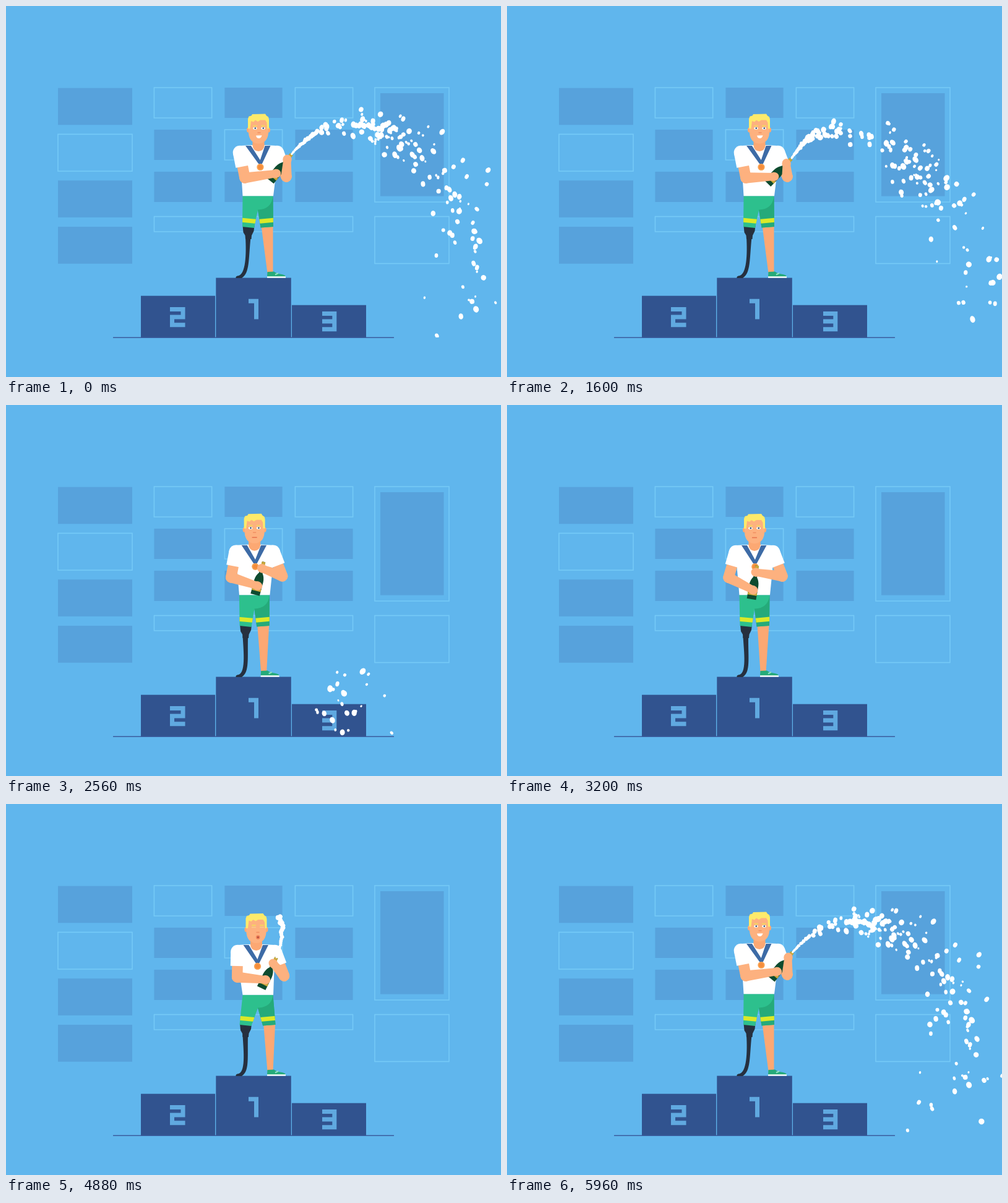
These frames come from a looping animation (800 px wide and 600 px high, 6000 ms). An HTML page with a canvas:

```html
<!DOCTYPE html>
<html lang="en">
<head>
<meta charset="utf-8">
<title>Champion on the podium</title>
<style>
html, body { margin: 0; width: 100%; height: 100%; overflow: hidden; background: #60b6ed; }
canvas { display: block; }
</style>
</head>
<body>
<canvas id="stage" width="800" height="600" aria-label="Winner on a podium spraying foam"></canvas>
<script>
const g = document.getElementById('stage').getContext('2d');
const LOOP = 6, TAU = Math.PI * 2;
const SKIN = '#fdb17f', SKIN_DARK = '#fca873', WHITE = '#fff', DARK = '#26303f', HAIR = '#fdea6b';
const NAVY = '#31538f', PANEL = '#57a2dc', GREEN = '#2dc08d', GREEN_DARK = '#25aa7a';
const LIME = '#dbe928', RIBBON = '#3d6ba6', BOTTLE = '#0e4b2f', GOLD = '#c9a83a';

const mix = (a, b, k) => a + (b - a) * k;
const ramp = (t, from, to) => Math.min(1, Math.max(0, (t - from) / (to - from)));
const ease = (t, from, to) => { const k = ramp(t, from, to); return k * k * (3 - 2 * k); };
const wave = (t, peak, period) => Math.cos((t - peak) / period * TAU);

// ---------- drawing helpers ----------
function fill(color, build) {
  g.fillStyle = color;
  g.beginPath();
  build();
  g.fill();
}
function trace(p) {
  for (let i = 0; i < p.length; i += 2) g.lineTo(p[i], p[i + 1]);
}
function poly(color, ...p) {
  fill(color, () => trace(p));
}
function disc(color, x, y, rx, ry = rx, turn = 0) {
  fill(color, () => g.ellipse(x, y, rx, ry, turn, 0, TAU));
}
function box(color, x, y, w, h) {
  g.fillStyle = color;
  g.fillRect(x, y, w, h);
}
function line(color, width, cap, ...p) {
  g.strokeStyle = color;
  g.lineWidth = width;
  g.lineCap = cap;
  g.beginPath();
  trace(p);
  g.stroke();
}

// ---------- pose: everything follows from how far the body leans, steps and crouches ----------
function poseAt(time) {
  const t = (time + LOOP) % LOOP;
  const lean = 1 - ease(t, 2.1, 2.75) + .56 * ease(t, 4.55, 4.8) + .44 * ease(t, 4.92, 5.25);
  const step = 1 - ease(t, 2.1, 2.75) + ease(t, 4.55, 4.8);
  const crouch = .5 * (ease(t, 1.8, 2.08) - ease(t, 2.15, 2.6)) + .9 * (ease(t, 4.55, 4.8) - ease(t, 4.92, 5.25));
  const aim = (.7 - .3 * wave(t, 0, 1.2)) * (1 - ease(t, 1.65, 2.05) + ease(t, 3, 4));
  const shake = t > 3.2 && t < 4.5 ? Math.sin((t - 3.2) * TAU * 4) * Math.sin(ramp(t, 3.2, 4.5) * Math.PI) : 0;

  const p = {
    hipX: 400 + 7 * step, hipY: 307.3 + 1.5 * crouch,
    chestX: 400 + 8 * lean, chestY: 227 - lean + 1.7 * crouch + 1.3 * shake,
    headX: 400 + 8 * lean, headY: 176 - 1.5 * lean + 2 * crouch + 1.3 * shake,
    kneeL: 386 + 5.5 * step - 5 * crouch, kneeR: 413.5 + 8 * step + 4 * crouch,
    shoe: 409 + 13 * step,
    botX: mix(395, 432 - 13 * aim, lean),
    botY: mix(314, 279 + 9 * aim, lean) + 3 * crouch * (1 - lean) + 6 * shake,
    tilt: mix(.17, .6 + .2 * aim, lean)
  };
  const along = d => [p.botX + d * Math.sin(p.tilt), p.botY - d * Math.cos(p.tilt)];
  p.handL = along(15);
  p.handR = along(44);
  p.nozzle = along(55);
  p.shoulderL = [p.chestX - 30, p.chestY + 11];
  p.shoulderR = [p.chestX + 30, p.chestY + 11];
  p.elbowL = [p.shoulderL[0] - 12 + 20 * lean, p.chestY + 52];
  p.elbowR = [p.shoulderR[0] + 15, p.chestY + 50];
  return p;
}

// ---------- foam ----------
const GRAVITY = 1400, FIRST = -1.24, LAST = 1.9, STEP = 1 / 300;

let seed = 11;
const rnd = () => (seed = seed * 16807 % 2147483647) / 2147483647;

const drops = [];
for (let born = FIRST; born < LAST; born += STEP) {
  const open = ramp(born, FIRST, -1.04);
  const power = 1 - .68 * ramp(born, 1.1, LAST);
  const turn = rnd() * TAU, push = 78 * rnd();
  const drop = {
    born, turn, at: poseAt(born).nozzle,
    vx: 335 * power * mix(.15, 1, open),
    vy: (-440 - 65 * wave(born, .43, 1.25)) * power - 230 * (1 - open),
    jx: Math.cos(turn) * push, jy: Math.sin(turn) * push,
    size: 1.6 + 3.4 * rnd(), shape: 1 + .4 * rnd(), life: .8 + .35 * rnd()
  };
  // foam leaves the bottle in gushes
  const density = open < 1 ? 1 : .6 + .4 * wave(born, .03, .485);
  if (rnd() < density) drops.push(drop);
}

function drawFoam(t) {
  const now = t > 4 ? t - LOOP : t;
  g.save();
  g.beginPath();
  g.rect(0, 0, 800, 536);
  g.clip();
  for (const d of drops) {
    const a = now - d.born;
    if (a < 0 || a > d.life) continue;
    const spread = a * Math.min(1, .25 + a * 2.2);
    const r = mix(4.6, d.size, ramp(a, 0, .35)) * Math.min(1, .35 + a * 5);
    const wide = Math.sqrt(d.shape);
    disc(WHITE, d.at[0] + d.vx * a + d.jx * spread,
      d.at[1] + d.vy * a + GRAVITY / 2 * a * a + d.jy * spread,
      r / wide, r * wide, d.turn / 4 - .8);
  }
  g.restore();
}

// ---------- scenery ----------
function panel(outlined, x, y, w, h) {
  if (!outlined) return box(PANEL, x, y, w, h);
  g.strokeStyle = '#75caf7';
  g.lineWidth = 1.6;
  g.strokeRect(x, y, w, h);
}

function drawWall() {
  box('#60b6ed', 0, 0, 800, 600);
  for (let i = 0; i < 4; i++) panel(i === 1, 84, 132.6 + 74.8 * i, 120, 59.7);
  for (let row = 0; row < 3; row++)
    for (let col = 0; col < 3; col++)
      panel(row < 2 && (row + col) % 2 === 0, 239.4 + 114 * col, 132 + 68 * row, 93.2, 49);
  panel(true, 239.5, 340.5, 321, 24.5);
  panel(true, 596, 132, 120, 185);
  panel(false, 605, 141, 102.5, 166.5);
  panel(true, 596, 340.5, 120, 76);
}

function drawPodium() {
  const digit = (...p) => line('#60a9e0', 7, 'butt', ...p);
  box(NAVY, 218, 468.7, 120, 67.6);
  box(NAVY, 339.3, 439.6, 121.5, 96.7);
  box(NAVY, 462, 483.7, 120, 52.6);
  line('#3b5d9e', 1.5, 'butt', 173, 536.3, 627, 536.3);
  g.lineJoin = 'miter';
  digit(265, 490.5, 286, 490.5, 286, 503, 268.5, 503, 268.5, 515.8, 289.5, 515.8);
  digit(392, 477.2, 404.5, 477.2, 404.5, 506.5);
  digit(511, 497.5, 530.8, 497.5, 530.8, 522.8, 511, 522.8);
  digit(511, 510, 530, 510);
}

// ---------- athlete ----------
function drawLegs({ hipX: h, hipY: y, kneeL: l, kneeR: r, shoe: s }) {
  poly(SKIN_DARK, r - 9, 355, r + 10, 355, s + 9.5, 432, s + .5, 432);
  fill(GREEN_DARK, () => {
    trace([s, 438, s + .5, 430, s + 11, 429.5]);
    g.quadraticCurveTo(s + 15, 433, s + 24, 434);
    g.quadraticCurveTo(s + 30, 435, s + 30, 438);
  });
  line('#8fe0c0', 2, 'butt', s + 13, 434.5, s + 18, 432);
  box(WHITE, s, 437.3, 30, 2.4);

  // running blade
  poly(DARK, l - 9, 355, l + 10, 355, l + 9, 364, l + 5.5, 371, l + 5, 377, l - 4.5, 377, l - 5, 371, l - 8, 366);
  fill(DARK, () => {
    g.moveTo(l - 4.5, 374);
    g.bezierCurveTo(l - 3, 400, 388, 436, 374, 436.5);
    g.quadraticCurveTo(371, 437, 371.5, 440);
    g.lineTo(381, 440);
    g.bezierCurveTo(394, 432, mix(392, l, .4), 410, l + 4, 374);
  });

  // shorts
  g.save();
  g.beginPath();
  trace([h - 24.5, y, h + 24.5, y, r + 10.5, 357, r - 10, 358.5, h, 330, l + 9.5, 359, l - 9.5, 357]);
  g.clip();
  box(GREEN, h - 40, y - 2, 80, 60);
  fill(GREEN_DARK, () => {
    g.moveTo(h + 24.5, y);
    g.quadraticCurveTo(h + 22, 329, h, 329.5);
    trace([h, 362, h + 40, 362, h + 40, y]);
  });
  line(LIME, 7, 'butt', l - 13, 346, l + 14, 348.5);
  line(LIME, 7, 'butt', r - 14, 348.5, r + 13, 346);
  g.restore();
}

function drawUpperArm([x, y], [ex, ey]) {
  const k = 23 / Math.hypot(ex - x, ey - y);
  line(SKIN, 17.5, 'round', x, y, ex, ey);
  line(WHITE, 22.5, 'butt', x, y, mix(x, ex, k), mix(y, ey, k));
  disc(WHITE, x, y, 11.3);
}

function drawForearm([ex, ey], [hx, hy]) {
  g.save();
  g.translate(ex, ey);
  g.rotate(Math.atan2(hy - ey, hx - ex));
  const length = Math.hypot(hx - ex, hy - ey);
  poly(SKIN, 0, -8.7, length, -6, length, 6, 0, 8.7);
  disc(SKIN, 0, 0, 8.7);
  disc(SKIN, length, 0, 8, 7.2);
  g.restore();
}

function drawBottle(p) {
  g.save();
  g.translate(p.botX, p.botY);
  g.rotate(p.tilt);
  fill(BOTTLE, () => {
    trace([-7.5, 0, -7.5, -23]);
    g.quadraticCurveTo(-7, -31, -3, -36);
    trace([-2.6, -55, 2.6, -55, 3, -36]);
    g.quadraticCurveTo(7, -31, 7.5, -23);
    g.lineTo(7.5, 0);
  });
  box(GOLD, -7.5, -11, 15, 4.5);
  box(GOLD, -2.9, -55, 5.8, 8);
  g.restore();
}

function drawHead(p, t) {
  const popping = t >= 4.62 && t < 5.15, calm = t > 2.35 && t < 4.62;
  g.save();
  g.translate(p.headX, p.headY);
  for (const side of [-1, 1]) disc(SKIN_DARK, side * 16.5, 26, 2.5, 4);
  fill(SKIN, () => {
    trace([-16, 8, 16, 8, 16, 31]);
    g.bezierCurveTo(15, 43, 8, 48, 0, 48);
    g.bezierCurveTo(-8, 48, -15, 43, -16, 31);
  });
  poly(HAIR, -17, 24, -17, 8, -15.5, 4, -11.5, 3, -10, .5, 11, 0, 13, 3, 16, 5, 17, 9, 17, 24,
    14, 24, 13.5, 14, 11, 10, 3, 10, -1, 12.5, -5, 10, -8, 13, -12, 11.5, -13.5, 24);

  g.translate(popping ? 2.5 : calm ? 0 : 1, 0);
  for (const x of [-6.5, 6.5]) {
    line('#f4d95e', 1.8, 'butt', x - 3.3, 19.2, x + 3.3, 19.2);
    if (popping) {
      line('#f7d08a', 1.4, 'butt', x - 3.5, 22.5, x + 3.5, 22.5);
    } else {
      disc(WHITE, x, 23.2, 3.3, 2);
      disc('#3d5877', x + .3, 23.2, 1.4);
    }
  }
  line('#f08f62', 1.4, 'round', -2, 30.5, 2, 30.5);
  if (popping) {
    disc('#ee7f57', .3, 38.5, 3.2);
    disc('#a9483c', .3, 38.6, 1.4);
  } else if (calm) {
    line('#e8754f', 1.6, 'butt', -4, 38.5, 4, 38.5);
  } else {
    fill(WHITE, () => {
      trace([-5, 35, 4.5, 34.8]);
      g.quadraticCurveTo(3.5, 39.5, -.5, 39.5);
      g.quadraticCurveTo(-4, 39.5, -5, 35);
    });
  }
  g.restore();
}

function drawAthlete(p, t) {
  const { chestX: x, chestY: y, hipX: h, hipY } = p;
  drawLegs(p);
  poly(WHITE, x - 30, y, x - 12, y - 1, x + 12, y - 1, x + 30, y, x + 29, y + 40,
    h + 25, hipY, h - 24.5, hipY, x - 28, y + 40);
  drawUpperArm(p.shoulderL, p.elbowL);
  drawUpperArm(p.shoulderR, p.elbowR);
  box(SKIN_DARK, x - 9.5, y - 14, 19, 14);
  disc(SKIN_DARK, x, y - .5, 9.5);

  // ribbon and medal
  const mx = x + (x - 397) * .27, my = y + 34.5;
  poly(RIBBON, x - 21, y, x - 12, y, mx + 1, y + 25, mx, y + 31, mx - 3, y + 29);
  poly(RIBBON, x + 10.5, y, x + 19.5, y, mx + 3, y + 29, mx, y + 31, mx - 1.5, y + 27);
  disc('#f9a04e', mx, my, 5.6);
  disc('#f58d3c', mx, my, 3.6);

  drawHead(p, t);
  drawBottle(p);
  drawForearm(p.elbowL, p.handL);
  drawForearm(p.elbowR, p.handR);
}

function frame(ms) {
  const t = ms / 1000 % LOOP;
  drawWall();
  drawPodium();
  drawAthlete(poseAt(t), t);
  drawFoam(t);
  requestAnimationFrame(frame);
}
frame(0);
</script>
</body>
</html>
```
